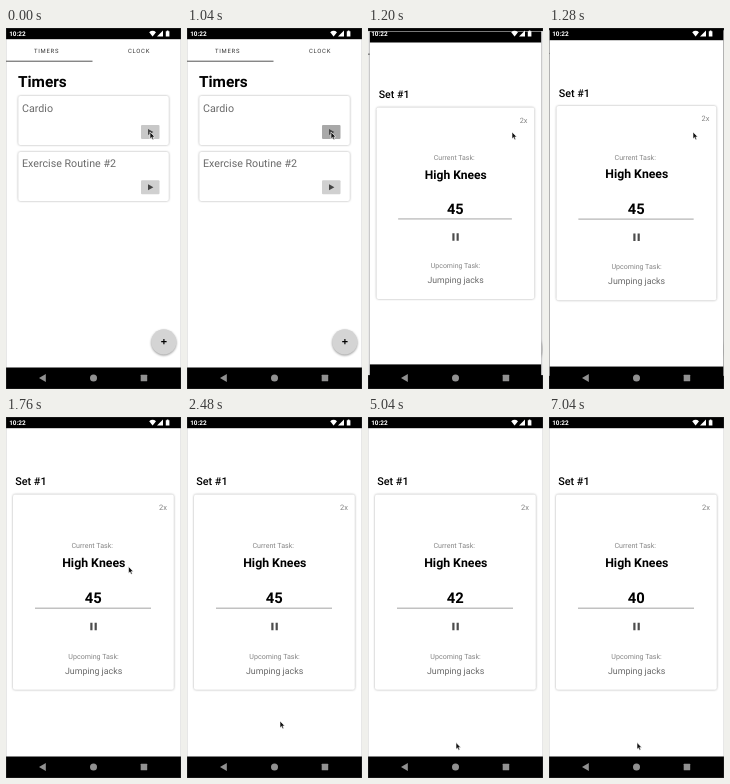
Write an HTML page that moves like this. It is 175 px wide and 361 px high and loops after 8 s.

```html
<!DOCTYPE html>
<html lang="en">
<head>
<meta charset="utf-8">
<title>Timers</title>
<style>
  html, body { margin: 0; height: 100%; overflow: hidden; background: #fff; }
  svg { display: block; width: 100vw; height: 100vh; }
  text { font-family: Roboto, sans-serif; text-rendering: geometricPrecision; }
  .mid { text-anchor: middle; }
  .bold { font-weight: 700; }
  .medium { font-weight: 500; }
  .grey { fill: #6a6a6a; }
  .pale { fill: #858585; }
  .tab { font-size: 5.9px; letter-spacing: .75px; fill: #333; }
  .name { font-size: 10.7px; }
  .label { font-size: 7.1px; }
  .card { fill: #fff; filter: drop-shadow(0 .9px 1.1px rgba(0, 0, 0, .34)); }
  .fab { fill: #d4d4d4; filter: drop-shadow(0 1px 1.3px rgba(0, 0, 0, .4)); }
</style>
</head>
<body>
<svg viewBox="0 0 175 361" preserveAspectRatio="none">
  <defs>
    <g id="window">
      <rect width="175" height="361"/>
      <rect y="11.2" width="175" height="328.3" fill="#fff"/>
    </g>
    <path id="play" d="M0 0 5.4 3 0 6Z" fill="#444"/>
  </defs>

  <rect width="175" height="361"/>

  <g id="list">
    <use href="#window"/>
    <text class="tab mid" x="40.6" y="25">TIMERS</text>
    <text class="tab mid" x="133" y="25">CLOCK</text>
    <rect y="32.7" width="86.5" height="1" fill="#555"/>
    <text class="bold" x="12" y="59" font-size="15.4">Timers</text>
    <rect class="card" x="12.3" y="68" width="150.5" height="49" rx="2"/>
    <text class="name grey" x="16" y="83.6">Cardio</text>
    <rect id="start" x="135" y="97" width="18.5" height="14" rx="1"/>
    <use href="#play" x="142" y="101"/>
    <rect class="card" x="12.3" y="124" width="150.5" height="49" rx="2"/>
    <text class="name grey" x="16" y="139.3">Exercise Routine #2</text>
    <rect x="135" y="152.3" width="18.5" height="14" rx="1" fill="#d0d0d0"/>
    <use href="#play" x="142" y="156.3"/>
    <circle class="fab" cx="157.8" cy="313.8" r="12.6"/>
    <path d="M155.2 313.6h5.4M157.9 310.9v5.4" stroke="#000" stroke-width="1.2"/>
  </g>

  <g id="workout">
    <use href="#window"/>
    <text class="medium" x="9.2" y="67.9" font-size="10.8">Set #1</text>
    <rect class="card" x="7" y="77.4" width="160.8" height="195.4" rx="2"/>
    <text class="pale" x="153" y="92.8" font-size="7.5">2x</text>
    <text class="label pale mid" x="86.2" y="131.4">Current Task:</text>
    <text class="bold mid" x="87.8" y="150.2" font-size="12.3">High Knees</text>
    <text id="count" class="bold mid" x="87.3" y="186" font-size="14.8"></text>
    <rect x="29" y="190.7" width="116" height=".9" fill="#999"/>
    <path d="M84.3 205.7h2.2v7.6h-2.2zM88.6 205.7h2.2v7.6h-2.2z" fill="#4c4c4c"/>
    <text class="label pale mid" x="87.6" y="241.6">Upcoming Task:</text>
    <text class="grey mid" x="87.6" y="256.6" font-size="8.85">Jumping jacks</text>
  </g>

  <g fill="#fff">
    <text class="bold" x="3.2" y="8.4" font-size="6.4">10:22</text>
    <path d="M143.2 4.2Q146.6 1.4 150 4.2L146.6 8.6Z"/>
    <path d="M157 2.6V8.6H151Z"/>
    <path d="M159.8 3.2h1v-.8h1.6v.8h1v5.4h-3.6z"/>
  </g>
  <g fill="#919191">
    <path d="M33 350 39.8 346V354Z"/>
    <circle cx="87.5" cy="350" r="3.5"/>
    <rect x="134.7" y="346.7" width="6.5" height="6.5" rx=".5"/>
  </g>
  <rect width="175" height="361" fill="none" stroke="#777" stroke-opacity=".35"/>

  <path id="pointer" d="M0 0V6.8L1.5 5.4 2.6 7.8 3.8 7.2 2.8 4.9H4.8Z"
        fill="#111" stroke="#fff" stroke-width=".6" stroke-linejoin="round"/>
</svg>

<script>
const LOOP = 8000, STEP = 80, CX = 87.5, CY = 180.5;
const $ = id => document.getElementById(id);
const list = $('list'), workout = $('workout'), start = $('start');
const count = $('count'), pointer = $('pointer');

// Rows: time, values...
const path = [
  [1680, 144, 104], [1760, 122.5, 149.5], [1840, 112, 189], [1920, 103, 222],
  [2000, 97, 244], [2080, 95, 255], [2240, 97, 262], [2400, 95, 290],
  [2560, 91, 318], [2720, 88.5, 335], [2800, 88, 336], [2960, 88, 325.5]
];
const opening = [
  [1040, 0, 0], [1120, .12, .2], [1200, .87, 1],
  [1280, .96, 1], [1360, .99, 1], [1440, 1, 1]
];
const press = [[640, 200], [720, 191], [800, 183], [880, 174], [1040, 168]];
const ticks = [3040, 4080, 5040, 6080, 7040];

function sample(rows, t) {
  const next = rows.findIndex(r => r[0] > t);
  if (next < 0) return rows[rows.length - 1].slice(1);
  if (next === 0) return rows[0].slice(1);
  const a = rows[next - 1], b = rows[next];
  const k = (t - a[0]) / (b[0] - a[0]);
  return a.slice(1).map((v, i) => v + (b[i + 1] - v) * k);
}

function scale(el, s) {
  el.setAttribute('transform', `translate(${CX} ${CY}) scale(${s}) translate(${-CX} ${-CY})`);
}

function draw(time) {
  const t = Math.floor(time % LOOP / STEP) * STEP;
  const [x, y] = sample(path, t);
  const [p, alpha] = sample(opening, t);
  const shade = Math.round(sample(press, t)[0]);

  pointer.setAttribute('transform', `translate(${x} ${y})`);
  scale(list, 1 + .055 * p);
  scale(workout, .85 + .15 * p);
  workout.setAttribute('opacity', alpha);
  start.setAttribute('fill', `rgb(${shade},${shade},${shade})`);
  count.textContent = 45 - ticks.filter(v => v <= t).length;
}

const begin = performance.now();
function loop() {
  draw(performance.now() - begin);
  requestAnimationFrame(loop);
}
loop();
</script>
</body>
</html>
```
